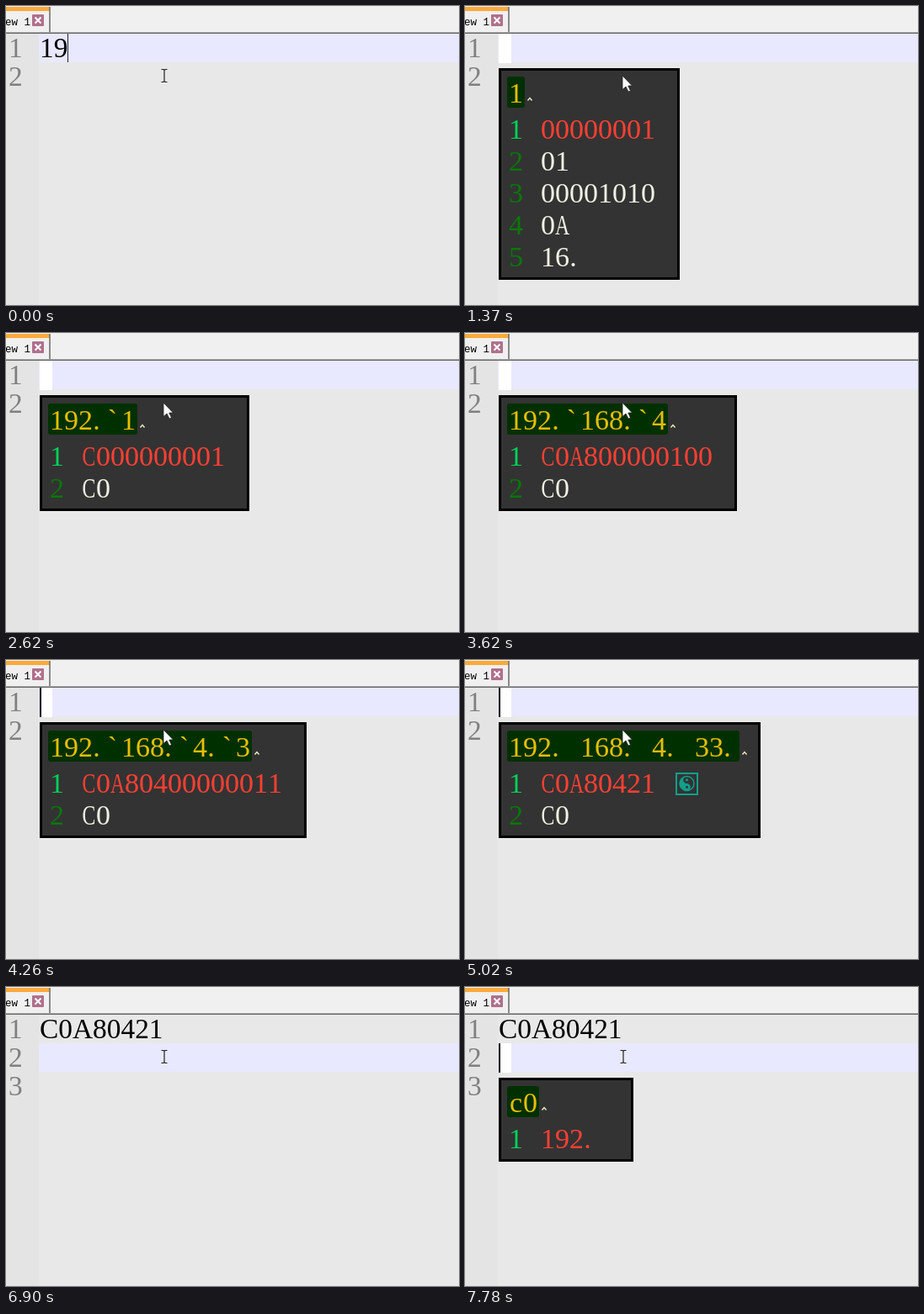
An HTML page that plays this animation: 538x356 px, repeating every 8 s.

```html
<!DOCTYPE html>
<html lang="en">
<head>
<meta charset="utf-8">
<title>Number conversion input</title>
<style>
  html, body { margin: 0; width: 100%; height: 100%; overflow: hidden; background: #e8e8e8; }
  svg { display: block; width: 538px; height: 356px; }
  .doc, .ime { font-family: "Liberation Serif", serif; white-space: pre; }
  .doc { font-size: 33.4px; }
  .ime { font-size: 34px; text-anchor: middle; }
  .tab { font: 12.5px "Liberation Mono", monospace; white-space: pre; }
  .tip { font: 16px "Noto Sans CJK SC", "Noto Sans CJK", sans-serif; text-anchor: middle; }
</style>
</head>
<body>
<svg id="stage" viewBox="0 0 538 356">
  <rect width="538" height="356" fill="#e8e8e8"/>
  <rect width="538" height="33" fill="#f0f0f0"/>
  <rect y="33" width="39" height="323" fill="#e4e4e4"/>
  <rect y="31" width="538" height="1" fill="#a0a0a0"/>
  <rect y="32" width="538" height="1" fill="#696969"/>
  <rect y="1" width="52" height="5" fill="#faaa3c"/>
  <path d="M52 1V31" stroke="#696969" stroke-width="1.5"/>
  <text class="tab" x="-1" y="23">ew 1</text>
  <rect x="31" y="10" width="14" height="14" rx="1" fill="#b0708c"/>
  <path d="M34.5 13.5l7 7m0 -7l-7 7" stroke="#fff" stroke-width="2"/>
  <g id="view"></g>
</svg>
<script>
const LOOP = 8000, CELL = 17, LINE = 34;
const view = document.getElementById("view");

// Each step changes only the listed parts of the state.
const start = { doc: "19", line: 0, caret: 73, typed: "", cands: [], tip: false, mark: false };
const type = (typed, ...cands) => ({ typed, cands, mark: false });
const show = caret => ({ caret });
const hide = { caret: null };
const steps = [
  [0, {}],
  [250, hide],
  [370, { doc: "1", caret: 56 }],
  [620, { doc: "", caret: 40 }],
  [870, { tip: true }],
  [1120, hide],
  [1370, { tip: false, ...type("1", "00000001", "01", "00001010", "0A", "16.") }],
  [1490, type("19", "00010011", "13", "25.")],
  [1620, type("192", "11000000", "C0")],
  [1890, show(40)],
  [2120, type("192.", "C0")],
  [2370, hide],
  [2620, type("192.`1", "C000000001", "C0")],
  [2750, type("192.`16", "C000010000", "C0")],
  [2870, show(40)],
  [3000, type("192.`168", "C010101000", "C0")],
  [3380, { ...type("192. 168.", "C0A8", "C0"), mark: true }],
  [3500, hide],
  [3620, type("192.`168.`4", "C0A800000100", "C0")],
  [3740, { ...type("192. 168. 4.", "C0A804", "C0"), mark: true }],
  [4010, show(40)],
  [4260, type("192.`168.`4.`3", "C0A80400000011", "C0")],
  [4390, type("192.`168.`4.`33", "C0A80400100001", "C0")],
  [4510, hide],
  [4640, { ...type("192. 168. 4. 33.", "C0A80421", "C0"), mark: true }],
  [5020, show(40)],
  [5650, { doc: "C0A80421", caret: 186, ...type("") }],
  [6150, hide],
  [6400, { line: 1, caret: 40 }],
  [6900, hide],
  [7280, type("c", "192.", "193.", "194.", "195.", "196.")],
  [7650, type("c0", "192.")],
  [7780, show(40)]
];

let last = start;
const states = steps.map(([, change]) => (last = { ...last, ...change }));

const rect = (x, y, w, h, fill, extra = "") =>
  `<rect x="${x}" y="${y}" width="${w}" height="${h}" fill="${fill}" ${extra}/>`;

const docText = (s, x, line, fill) =>
  `<text class="doc" x="${x}" y="${61 + line * LINE}" fill="${fill}">${s}</text>`;

// Half-width cells: capitals are condensed, dots and backticks sit to the left.
function cells(s, x, y, fill) {
  return [...s].map((ch, i) => {
    if (ch === " ") return "";
    const shift = ch === "." ? -4 : ch === "`" ? -2 : 0;
    const cx = x + CELL * (i + .5) + shift;
    const squeeze = /[A-Z]/.test(ch) ? .7 : 1;
    return `<text class="ime" transform="translate(${cx} ${y}) scale(${squeeze} 1)" fill="${fill}">${ch}</text>`;
  }).join("");
}

function yinYang(x, y) {
  const c = "#10a08c";
  return `<g transform="translate(${x} ${y})">
    <rect x="-12.5" y="-12" width="25" height="25" fill="none" stroke="${c}" stroke-width="2"/>
    <circle r="8.5" fill="none" stroke="${c}" stroke-width="1.4"/>
    <path d="M0 -8.5A8.5 8.5 0 0 0 0 8.5A4.25 4.25 0 0 0 0 0A4.25 4.25 0 0 1 0 -8.5" fill="${c}"/>
    <circle cy="-4.2" r="1.5" fill="${c}"/><circle cy="4.2" r="1.5" fill="#333"/></g>`;
}

function panel({ typed, cands, mark, line }) {
  const top = 74 + line * LINE;
  const inputEnd = 54 + CELL * typed.length;
  const textEnd = Math.max(...cands.map(s => 90 + CELL * s.length));
  const markX = 90 + CELL * cands[0].length + 37.5;
  const right = Math.max(200, inputEnd + 25, textEnd + 29, mark ? markX + 43 : 0);
  const height = 62 + 38 * cands.length;
  let out = rect(40, top, right - 40, height, "#000")
    + rect(43, top + 3, right - 46, height - 6, "#333")
    + rect(50, top + 10, inputEnd - 50, 37, "#003000", 'rx="3"')
    + cells(typed, 52, top + 41, "#e6be00")
    + `<path d="M${inputEnd + 3.5} ${top + 38.5}l2.5 -3l2.5 3" fill="none" stroke="#f0f0c0" stroke-width="1.4"/>`;
  cands.forEach((s, i) => {
    const y = top + 84 + 38 * i;
    out += cells(String(i + 1), 52, y, i ? "#087808" : "#00d25a")
      + cells(s, 90, y, i ? "#f0f0e4" : "#ff4034");
  });
  return out + (mark ? yinYang(markX, top + 73) : "");
}

const arrow = `<path d="M187 83V99.5L191 96L194 102L196.5 101L193.8 95H198.5Z"
  fill="#fff" stroke="#222" stroke-width=".8"/>`;
const beam = `<path d="M184.5 75.5H187L188 76.5L189 75.5H191.5M188 76V90M184.5 90.5H187L188 89.5L189 90.5H191.5"
  fill="none" stroke="#222" stroke-width="1.2"/>`;
const tip = rect(95, 106, 32, 32, "#000") + rect(97, 108, 28, 28, "#333")
  + '<text class="tip" x="111" y="128" fill="#f0f0e4">中</text>';

function draw(s) {
  const top = 33 + s.line * LINE;
  const busy = s.typed !== "";
  let out = rect(39, top, 499, LINE, "#e8e8ff");
  for (let i = 0; i < 2 + s.line; i++) out += docText(i + 1, 3, i, "#808080");
  out += docText(s.doc, 40, 0, "#000");
  if (busy) out += rect(40, top, 15, 35, "#fff");
  if (s.caret !== null) out += rect(s.caret, top, busy ? 2 : 1, busy ? 35 : LINE, busy ? "#000" : "#202040");
  if (s.tip) out += tip;
  if (busy) out += panel(s);
  view.innerHTML = out + (busy && s.line === 0 ? arrow : beam);
}

let shown = -1;
function tick() {
  const t = performance.now() % LOOP;
  const now = steps.findLastIndex(([at]) => at <= t);
  if (now !== shown) draw(states[shown = now]);
  requestAnimationFrame(tick);
}
tick();
</script>
</body>
</html>
```
